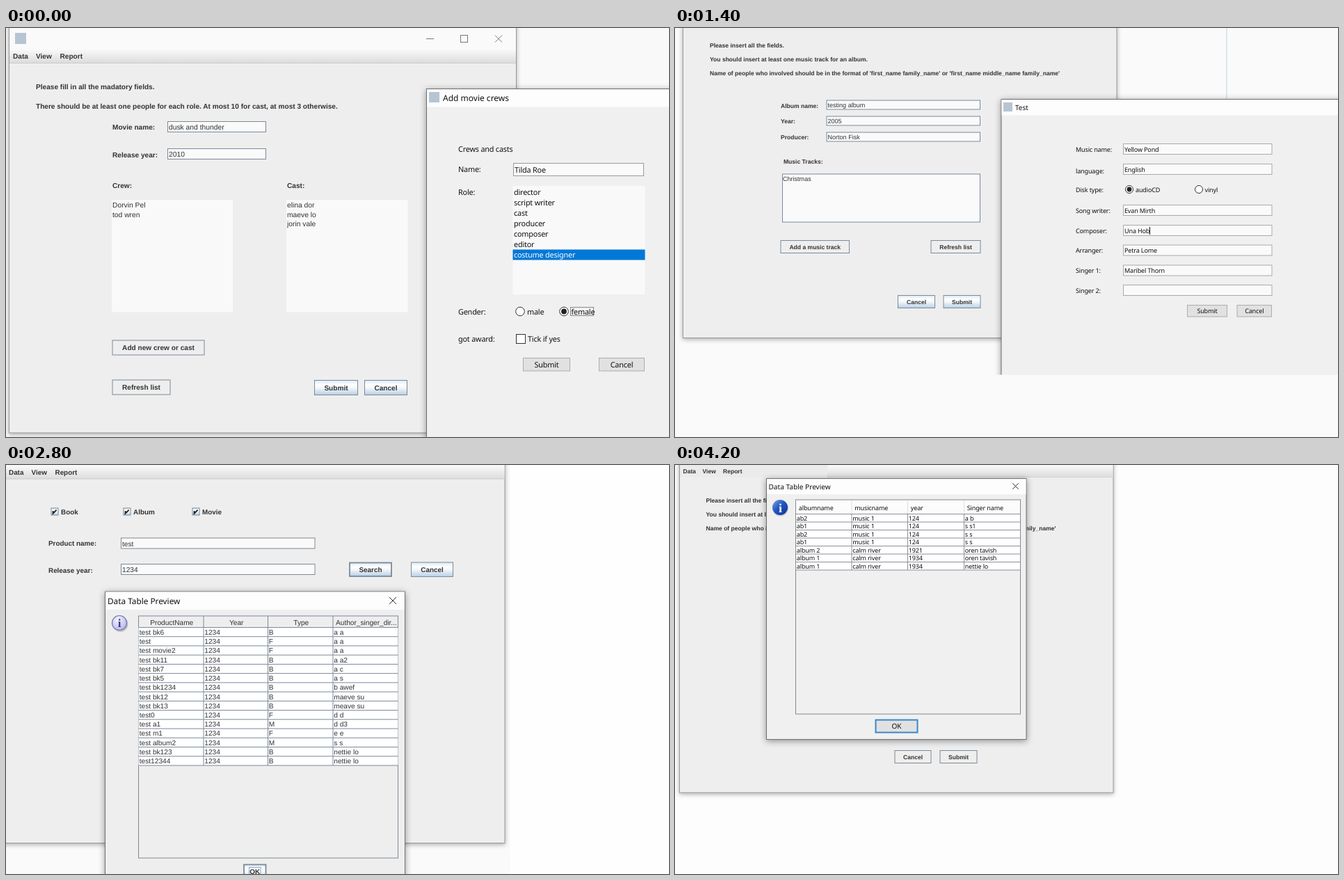
Animation of 953 by 588 pixels, one loop 5.6 s. Source, as an HTML page:

```html
<!DOCTYPE html>
<html lang="en">
<head>
<meta charset="utf-8">
<title>Form windows</title>
<style>
html, body { margin: 0; width: 100%; height: 100%; overflow: hidden; background: #fafafa; }
svg { display: block; width: 100vw; height: 100vh; }
text { text-rendering: geometricPrecision; white-space: pre; fill: #333; }
.b { font-family: "Liberation Sans", Arial, sans-serif; font-weight: 700; }
.r { font-family: "Liberation Sans", Arial, sans-serif; }
.n { font-family: "Noto Sans", "Open Sans", sans-serif; letter-spacing: -.018em; fill: #111; }
.h { font-family: "Noto Sans", "Open Sans", sans-serif; fill: #111; }
.mid { text-anchor: middle; }
.win { filter: drop-shadow(0 2px 3px rgba(0, 0, 0, .3)); }
.dlg { filter: drop-shadow(0 2px 5px rgba(0, 0, 0, .4)); }
.scene { visibility: hidden; animation: show 5600ms step-end infinite; }
@keyframes show {
  0% { visibility: visible; }
  25%, 100% { visibility: hidden; }
}
</style>
</head>
<body>
<svg id="stage" viewBox="0 0 953 588" preserveAspectRatio="none">
  <defs>
    <linearGradient id="metal" x2="0" y2="1">
      <stop offset="0" stop-color="#dde8f3"/><stop offset=".3" stop-color="#fff"/>
      <stop offset=".5" stop-color="#f4f8fb"/><stop offset="1" stop-color="#b8cfe5"/>
    </linearGradient>
    <linearGradient id="bar" x2="0" y2="1">
      <stop offset="0" stop-color="#fafafa"/><stop offset="1" stop-color="#dcdcdc"/>
    </linearGradient>
    <radialGradient id="lilac" cx=".4" cy=".3" r=".75">
      <stop offset="0" stop-color="#f4f4ff"/><stop offset="1" stop-color="#b4b4ec"/>
    </radialGradient>
    <linearGradient id="navy" x2="1" y2="1">
      <stop offset="0" stop-color="#7fa6e6"/><stop offset=".45" stop-color="#2458c0"/>
      <stop offset="1" stop-color="#0b2f92"/>
    </linearGradient>
  </defs>
</svg>
<script>
const STEEL = '#7a8a99', BODY = '#eee', PANE = '#f0f0f0', PAPER = '#fafafa';

// Boxes are given by their left, top, right and bottom edges.
const box = (x, y, x2, y2, fill, line = 'none', w = 1, extra = '') =>
  `<rect x="${x}" y="${y}" width="${x2 - x}" height="${y2 - y}" fill="${fill}" stroke="${line}" stroke-width="${w}" ${extra}/>`;
const path = (d, line, w = 1, extra = '') =>
  `<path d="${d}" fill="none" stroke="${line}" stroke-width="${w}" ${extra}/>`;
const disc = (x, y, r, fill, line = 'none', w = 1) =>
  `<circle cx="${x}" cy="${y}" r="${r}" fill="${fill}" stroke="${line}" stroke-width="${w}"/>`;

// Text is placed by the middle of its capitals.
const text = (kind, size) => (x, y, s, mod = '', extra = '') =>
  `<text class="${kind} ${mod}" x="${x}" y="${y + size * .36}" font-size="${size}" ${extra}>${s}</text>`;
const column = (put, x, y, step, items) => items.map((s, i) => put(x, y + i * step, s)).join('');

const button = (put, x, y, x2, y2, s, fill = BODY, line = STEEL, w = 1) =>
  box(x, y, x2, y2, fill, line, w) + put((x + x2) / 2, (y + y2) / 2, s, 'mid');
const field = (put, x, y, x2, y2, s, line = STEEL) =>
  box(x, y, x2, y2, PAPER, line) + put(x + 1.5, (y + y2) / 2 + .5, s);
const radio = (x, y, r, on) =>
  disc(x, y, r, '#fff', '#333') + (on ? disc(x, y, r * .62, '#222') : '');
const cross = (x, y, r, c = '#333') =>
  path(`M${x - r} ${y - r}l${2 * r} ${2 * r}m0 ${-2 * r}l${-2 * r} ${2 * r}`, c);
const ticked = (x, y) => box(x, y, x + 10, y + 10, 'url(#metal)', STEEL) +
  path(`M${x + 2.6} ${y + 4}v3.6l5-5`, '#222', 1.9);
const badge = (x, y, s) => box(x, y, x + s, y + s, '#b7c4d2');

const dialog = (x, y, x2, y2, bar, fill = PANE) =>
  box(x, y, x2, y2, fill, '#707070', 1, 'class="dlg"') +
  box(x + .5, y + .5, x2 - .5, bar, '#fdfdfd');

function table(put, xs, top, y0, step, rows, line) {
  const end = y0 + step * rows.length;
  let d = '';
  for (let i = 0; i <= rows.length; i++) d += `M${xs[0]} ${y0 + i * step}H${xs[4]}`;
  for (const x of xs.slice(1, 4)) d += `M${x} ${y0}V${end}`;
  return box(xs[0], y0, xs[4], end, '#fff') + path(d, line) +
    rows.map((row, i) => row.split('|').map((s, k) =>
      put(xs[k] + 1.3, y0 + (i + .5) * step + .2, s)).join('')).join('');
}

const menu = (put, xs, y) => ['Data', 'View', 'Report'].map((s, i) => put(xs[i], y, s)).join('');

function movieForm() {
  const b = text('b', 10.1), r = text('r', 10.3), n = text('n', 10.85), h = text('h', 12);
  const roles = ['director', 'script writer', 'cast', 'producer', 'composer', 'editor'];
  return box(0, 0, 953, 588, '#f9f9f9') +
    box(4.5, -5, 733.5, 582, BODY, '#999', 1, 'class="win"') +
    box(5, 0, 733, 30, PAPER) + box(5, 30, 733, 50, 'url(#bar)') + path('M5 50.5H733', '#ccc') +
    badge(13, 7, 16) +
    path('M604 15.5H615', '#777') + box(653.5, 10.5, 663.5, 20.5, 'none', '#777') + cross(708, 15.5, 5, '#777') +
    menu(b, [10, 43, 77.5], 40) +
    b(43, 84, 'Please fill in all the madatory fields.') +
    b(43, 112.5, 'There should be at least one people for each role. At most 10 for cast, at most 3 otherwise.') +
    b(153, 142.5, 'Movie name:') + field(r, 232.5, 134.5, 373.5, 149.5, 'dusk and thunder') +
    b(153, 182, 'Release year:') + field(r, 232.5, 173.5, 373.5, 188.5, '2010') +
    b(153, 226, 'Crew:') + b(404, 226, 'Cast:') +
    box(152, 247, 326, 408.5, '#f9f9f9') + box(403, 247, 577.5, 408.5, '#f9f9f9') +
    column(r, 153, 254.5, 13.4, ['Dorvin Pel', 'tod wren']) +
    column(r, 404, 254.5, 13.4, ['elina dor', 'maeve lo', 'jorin vale']) +
    button(b, 153, 449, 285, 470, 'Add new crew or cast') +
    button(b, 153, 506, 236, 527, 'Refresh list') +
    button(b, 443.5, 506.5, 505.5, 527.5, 'Submit', 'url(#metal)') +
    button(b, 515.5, 506.5, 576.5, 527.5, 'Cancel', 'url(#metal)') +
    dialog(604.5, 87.5, 970, 600, 113.5) + badge(608, 92, 15) + h(628, 100.5, 'Add movie crews') +
    n(650, 174.5, 'Crews and casts') +
    n(650, 203.5, 'Name:') + field(n, 729.5, 194.5, 916.5, 212.5, 'Tilda Roe', '#999') +
    n(650, 236, 'Role:') + box(728.5, 227, 918.5, 383, '#f9f9f9') +
    column(n, 730, 236, 15.05, roles) +
    box(728.5, 318.5, 918.5, 333.5, '#0078d7') + n(730, 326.3, 'costume designer', '', 'style="fill:#fff"') +
    n(650, 408, 'Gender:') + radio(739, 407.5, 6.3) + n(749, 408, 'male') +
    radio(802, 407.5, 6.3, true) + n(812.5, 408, 'female') +
    box(811.5, 401.5, 844.5, 413.5, 'none', '#222', 1, 'stroke-dasharray="1 1"') +
    n(650, 447.5, 'got award:') + box(733.5, 440.5, 746.5, 453.5, '#fff', '#333') + n(750, 447.5, 'Tick if yes') +
    button(n, 743.5, 474.5, 810.5, 493, 'Submit', '#e1e1e1', '#adadad') +
    button(n, 852.5, 474.5, 917.5, 493, 'Cancel', '#e1e1e1', '#adadad');
}

const albumNotes = (b, x, y) =>
  b(x, y, 'Please insert all the fields.') +
  b(x, y + 19.5, 'You should insert at least one music track for an album.') +
  b(x, y + 39.5, "Name of people who involved should be in the format of 'first_name family_name' or 'first_name middle_name family_name'");

function albumForm() {
  const b = text('b', 8.55), r = text('r', 9.05), n = text('n', 9.05), h = text('h', 10);
  const entries = [
    ['Music name:', 174, 'Yellow Pond'], ['language:', 203, 'English'], ['Song writer:', 262, 'Evan Mirth'],
    ['Composer:', 291, 'Una Hob'], ['Arranger:', 319.5, 'Petra Lome'],
    ['Singer 1:', 348.5, 'Maribel Thorn'], ['Singer 2:', 377, '']
  ];
  return box(0, 0, 953, 588, PAPER) + path('M793 0V102', '#cfe0ec', 1.5) +
    box(11.5, -5, 635, 445.5, BODY, '#999', 1, 'class="win"') +
    albumNotes(b, 50, 25) +
    b(152, 111.5, 'Album name:') + field(r, 218, 104, 438.5, 117, 'testing album') +
    b(152, 134, 'Year:') + field(r, 218, 127, 438.5, 140, '2005') +
    b(152, 157, 'Producer:') + field(r, 218, 150, 438.5, 163, 'Norton Fisk') +
    b(156, 191.5, 'Music Tracks:') + box(154.5, 210, 438.5, 279, PAPER, STEEL) + r(155, 217, 'Christmas') +
    button(b, 152, 305.5, 250.5, 323.5, 'Add a music track') +
    button(b, 368, 305.5, 439, 323.5, 'Refresh list') +
    button(b, 320.5, 384.5, 373.5, 402.5, 'Cancel', 'url(#metal)') +
    button(b, 386, 384.5, 439, 402.5, 'Submit', 'url(#metal)') +
    dialog(469, 102.5, 970, 520, 125.5) + box(440, 498.5, 953, 588, PAPER) +
    badge(472, 107, 13) + h(489, 114.5, 'Test') +
    entries.map(([s, y, v]) => n(576, s[0] === 'l' ? y + 2.5 : y + .5, s) +
      field(n, 644.5, y - 7.5, 858, y + 7.5, v, '#aaa')).join('') +
    path('M682.5 286V297', '#111') +
    n(576, 232.5, 'Disk type:') + radio(653, 232, 5.5, true) + n(662, 232.5, 'audioCD') +
    radio(753, 232, 5.5) + n(761.5, 232.5, 'vinyl') +
    button(n, 736.5, 398.5, 793.5, 415, 'Submit', '#e1e1e1', '#adadad') +
    button(n, 808, 398.5, 857.5, 415, 'Cancel', '#e1e1e1', '#adadad');
}

function searchForm() {
  const b = text('b', 9.9), r = text('r', 10.15), h = text('h', 11.8), i = text('b', 17);
  const xs = [190.5, 284, 376.5, 470, 563.5];
  const rows = [
    'test bk6|B|a a', 'test|F|a a', 'test movie2|F|a a', 'test bk11|B|a a2', 'test bk7|B|a c',
    'test bk5|B|a s', 'test bk1234|B|b awef', 'test bk12|B|maeve su', 'test bk13|B|meave su',
    'test0|F|d d', 'test a1|M|d d3', 'test m1|F|e e', 'test album2|M|s s',
    'test bk123|B|nettie lo', 'test12344|B|nettie lo'
  ].map(s => s.replace('|', '|1234|'));
  return box(0, 0, 953, 588, '#fefefe') + box(0, 0, 724.5, 588, PAPER) +
    box(-5, -5, 717, 543.5, BODY, '#999', 1, 'class="win"') +
    box(0, 0, 716.5, 20, 'url(#bar)') + path('M0 20H716.5', '#ccc') +
    menu(b, [4, 36.5, 70.5], 10) +
    ['Book', 'Album', 'Movie'].map((s, k) => {
      const x = [65, 169, 268][k];
      return ticked(x, 62) + b(x + 14, 67.5, s);
    }).join('') +
    b(61, 112, 'Product name:') + field(r, 165.5, 105, 444, 120, 'test') +
    b(61, 151, 'Release year:') + field(r, 165.5, 142.5, 444, 157.5, '1234') +
    button(b, 494, 140.5, 554, 160, 'Search', 'url(#metal)', STEEL, 1.8) +
    button(b, 582.5, 140, 642.5, 160.5, 'Cancel', 'url(#metal)') +
    dialog(142.5, 182, 573.5, 600, 208, BODY) + h(146, 195.5, 'Data Table Preview') + cross(556, 195, 5) +
    disc(164.5, 229, 11, '#c4c4c4') + disc(163, 227, 10.5, 'url(#lilac)', '#7474b4', 1.2) +
    i(163, 227, 'i', 'mid', 'style="fill:#3c3c8c;font-family:Liberation Serif,serif"') +
    box(xs[0], 217, xs[4], 565, BODY, STEEL) +
    path(xs.slice(1, 4).map(x => `M${x} 217V233.5`).join(''), STEEL) +
    ['ProductName', 'Year', 'Type'].map((s, k) => r((xs[k] + xs[k + 1]) / 2 + 1, 226, s, 'mid')).join('') +
    r(474, 226, 'Author_singer_dir...') +
    table(r, xs, 217, 233.5, 13.23, rows, STEEL) +
    button(b, 342, 574.5, 373.5, 595, 'OK', 'url(#metal)', STEEL, 1.8) +
    box(349.5, 578.5, 366, 592, 'none', '#8fa6c4');
}

function albumTable() {
  const b = text('b', 8.55), n = text('n', 9.05), h = text('h', 10.1), i = text('b', 18);
  const xs = [173.5, 254, 334.5, 415.5, 496.5];
  const rows = [
    'ab2|music 1|124|a b', 'ab1|music 1|124|s s1', 'ab2|music 1|124|s s', 'ab1|music 1|124|s s',
    'album 2|calm river|1921|oren tavish', 'album 1|calm river|1934|oren tavish', 'album 1|calm river|1934|nettie lo'
  ];
  return box(0, 0, 953, 588, '#fdfdfd') +
    box(6.5, -5, 630, 471, BODY, '#999', 1, 'class="win"') +
    box(7, 0, 219, 17.5, '#ebebeb') + box(219, 0, 629.5, 17.5, 'url(#bar)') + path('M219 17.5H629.5', '#d4d4d4') +
    menu(b, [11.5, 39.5, 69], 9) + albumNotes(b, 44.5, 51) +
    button(b, 316, 410.5, 368, 428.5, 'Cancel') + button(b, 381, 410.5, 434, 428.5, 'Submit') +
    dialog(131.5, 19.5, 505, 394.5, 42) + h(134.5, 31, 'Data Table Preview') + cross(489.5, 30.5, 4.3) +
    disc(151.5, 62, 11.5, '#c8ccd4') + disc(151, 61, 11, 'url(#navy)') +
    i(151.5, 61.5, 'i', 'mid', 'style="fill:#fff;font-family:Liberation Serif,serif"') +
    box(xs[0], 50, xs[4], 358, PANE) + box(xs[0], 50, xs[4], 70.5, '#fcfcfc') +
    path(xs.slice(1, 4).map(x => `M${x} 51V70`).join(''), '#ddd') +
    ['albumname', 'musicname', 'year', 'Singer name'].map((s, k) => n(xs[k] + 4.3, 61.5, s)).join('') +
    table(n, xs, 50, 70.5, 11.5, rows, '#8c8f98') +
    box(xs[0], 50, xs[4], 358, 'none', '#828790') +
    button(h, 288.5, 366.5, 348.5, 384.5, 'OK', '#e1e1e1', '#3a87cc', 2);
}

document.getElementById('stage').insertAdjacentHTML('beforeend',
  [movieForm, albumForm, searchForm, albumTable].map((draw, k) =>
    `<g class="scene" style="animation-delay:${k ? (k - 4) * 1400 : 0}ms">${draw()}</g>`).join(''));
</script>
</body>
</html>
```
